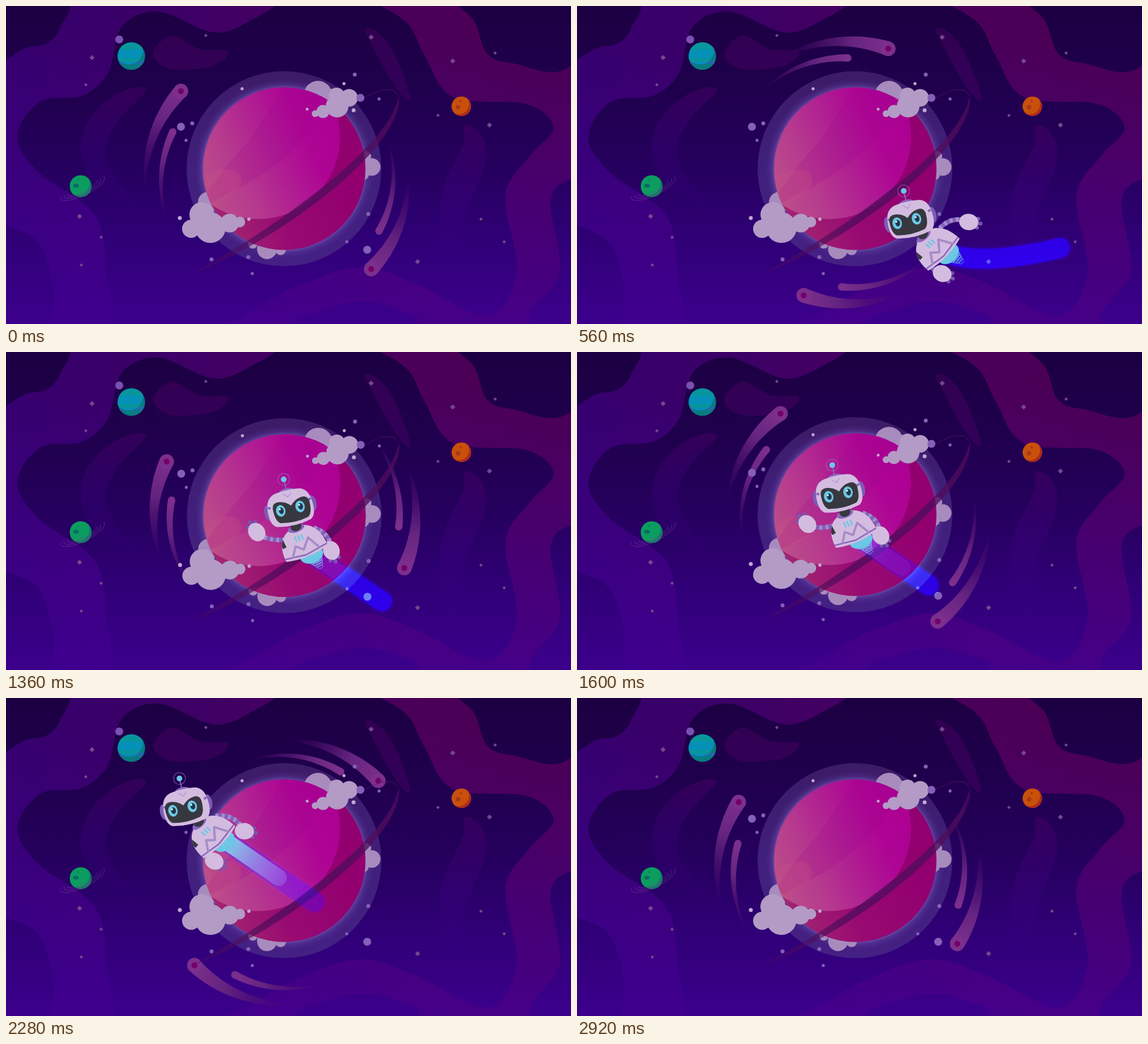
An HTML page with a canvas for the animation above (2960 ms loop, 998 px wide and 561 px high).

```html
<!DOCTYPE html>
<html lang="en">
<head>
<meta charset="utf-8">
<title>Robot in space</title>
<style>
html, body { margin: 0; width: 100%; height: 100%; overflow: hidden; background: #22004f; }
canvas { display: block; width: 998px; height: 561px; }
</style>
</head>
<body>
<canvas id="stage" width="998" height="561"></canvas>
<script>
const W = 998, H = 561, LOOP = 2960, STEP = 40, RAD = Math.PI / 180;
const ENTER = 560, LEAVE = 2280;
const SHELL = '#d3bce0', TRIM = '#8a66bd', CYAN = '#6cc8e4', INK = '#37383f';
const stage = document.getElementById('stage');
let c;

const clamp = u => Math.min(1, Math.max(0, u));
const mix = (a, b, u) => a + (b - a) * u;
function turn(x, y, deg) {
  const s = Math.sin(deg * RAD), k = Math.cos(deg * RAD);
  return [x * k - y * s, x * s + y * k];
}

// ---- drawing helpers ----
function disc(x, y, r, fill) {
  c.beginPath();
  c.arc(x, y, r, 0, 7);
  c.fillStyle = fill;
  c.fill();
}
function oval(x, y, rx, ry, fill) {
  c.beginPath();
  c.ellipse(x, y, rx, ry, 0, 0, 7);
  c.fillStyle = fill;
  c.fill();
}
function ring(x, y, rx, ry, color, width, rot = 0, from = 0, to = 360) {
  c.beginPath();
  c.ellipse(x, y, rx, ry, rot * RAD, from * RAD, to * RAD);
  c.strokeStyle = color;
  c.lineWidth = width;
  c.stroke();
}
function line(pts, color, width) {
  c.beginPath();
  for (let i = 0; i < pts.length; i += 2) c.lineTo(pts[i], pts[i + 1]);
  c.strokeStyle = color;
  c.lineWidth = width;
  c.stroke();
}
function shape(d, fill) {
  c.fillStyle = fill;
  c.fill(new Path2D(d));
}
function fade(x0, y0, x1, y1, ...cols) {
  const g = c.createLinearGradient(x0, y0, x1, y1);
  cols.forEach((col, i) => g.addColorStop(i / (cols.length - 1), col));
  return g;
}
function clipDisc(x, y, r, draw) {
  c.save();
  c.beginPath();
  c.arc(x, y, r, 0, 7);
  c.clip();
  draw();
  c.restore();
}
function place(x, y, deg, draw) {
  c.save();
  c.translate(x, y);
  c.rotate(deg * RAD);
  draw();
  c.restore();
}
// Closed smooth curve through x, y pairs
function blob(p, fill) {
  const n = p.length / 2, at = i => [p[(i + n) % n * 2], p[(i + n) % n * 2 + 1]];
  c.beginPath();
  c.moveTo(p[0], p[1]);
  for (let i = 0; i < n; i++) {
    const [a, b, d, e] = [at(i - 1), at(i), at(i + 1), at(i + 2)];
    c.bezierCurveTo(b[0] + (d[0] - a[0]) / 6, b[1] + (d[1] - a[1]) / 6,
      d[0] - (e[0] - b[0]) / 6, d[1] - (e[1] - b[1]) / 6, d[0], d[1]);
  }
  c.fillStyle = fill;
  c.fill();
}
// Band along at(u) with half-width wide(u)
function ribbon(at, wide, fill) {
  const N = 40, left = [], right = [];
  for (let i = 0; i <= N; i++) {
    const u = i / N, [x, y] = at(u), [ax, ay] = at(u - .01), [bx, by] = at(u + .01);
    const w = wide(u) / Math.hypot(bx - ax, by - ay);
    left.push([x - (by - ay) * w, y + (bx - ax) * w]);
    right.unshift([x + (by - ay) * w, y - (bx - ax) * w]);
  }
  c.beginPath();
  for (const p of left.concat(right)) c.lineTo(...p);
  c.fillStyle = fill;
  c.fill();
}
const bezier = (...p) => u => [0, 1].map(k => {
  const v = 1 - u;
  return v * v * v * p[k] + 3 * v * v * u * p[k + 2] + 3 * v * u * u * p[k + 4] + u * u * u * p[k + 6];
});
const rounded = w => u => w * Math.sqrt(Math.sin(Math.PI * u));

// ---- scenery ----
function backdrop() {
  c.fillStyle = fade(0, 0, W, 0, '#36006e', '#3a0067', '#450060', '#4b0058', '#4b0052');
  c.fillRect(0, 0, W, H);
  c.fillStyle = fade(0, 60, 0, H, 'rgba(60,0,160,0)', 'rgba(64,0,160,.32)', 'rgba(66,0,160,.68)');
  c.fillRect(0, 0, W, H);

  const dark = fade(0, 0, 0, H, '#1c0042', '#1f004c', '#25005d', '#300078', '#3c008c');
  blob([-60, -60, 103, -20, 95, 40, 70, 67, 35, 74, 0, 95, -60, 130], dark);
  blob([790, -40, 828, 28, 850, 84, 895, 101, 998, 105, 1080, -60], dark);
  blob([1080, 290, 998, 305, 962, 345, 978, 470, 928, 561, 1080, 640], dark);
  blob([510, 566, 575, 532, 635, 521, 690, 535, 727, 561, 620, 640], dark);
  blob([-60, 370, 0, 387, 65, 430, 75, 561, -60, 640], dark);
  // Inner space
  blob([20, 230, 60, 169, 135, 158, 180, 118, 205, 36, 270, 10, 370, 47, 448, 17, 520, -25, 600, -20, 665, 2,
    712, 34, 740, 88, 790, 161, 920, 173, 967, 215, 925, 265, 882, 335, 902, 470, 850, 546, 722, 489, 625, 461,
    510, 497, 385, 561, 220, 600, 182, 500, 160, 373, 58, 294], dark);

  const haze = 'rgba(105,0,120,.27)';
  blob([260, 84, 292, 52, 342, 76, 392, 80, 365, 106, 290, 111], haze);
  ribbon(bezier(634, 40, 665, 60, 680, 110, 713, 168), rounded(14), haze);
  ribbon(bezier(248, 146, 160, 180, 98, 279, 233, 352), rounded(23), fade(0, 145, 0, 350, haze, 'rgba(75,0,150,.2)', 'rgba(70,0,160,.05)'));
  ribbon(bezier(810, 210, 870, 280, 745, 310, 800, 480), rounded(27), fade(0, 210, 0, 470, haze, 'rgba(75,0,140,.2)', 'rgba(70,0,150,0)'));

  const star = r => ([x, y]) => shape(`M${x - r},${y}l${r},${-r} ${r},${r} ${-r},${r}z`, '#75488c');
  [[152, 91], [645, 55], [789, 97], [854, 210], [727, 451], [130, 371]].forEach(star(4.5));
  [[141, 139], [353, 52], [864, 83], [763, 193], [839, 376], [880, 416], [168, 408], [133, 457]].forEach(star(3.1));

  smallPlanets();
}

function smallPlanets() {
  disc(200, 59, 7, '#7a50b0');
  clipDisc(221.5, 88.5, 24.3, () => {
    disc(221, 88, 25, '#087c80');
    c.fillStyle = '#1a6fa0';
    c.fillRect(190, 96, 60, 7);
    clipDisc(217, 78, 25, () => {
      disc(217, 78, 26, '#0590b8');
      c.fillStyle = '#08969c';
      c.fillRect(190, 62, 60, 15);
      c.fillRect(190, 92, 60, 6);
    });
  });
  disc(132, 318, 19.3, '#0c8062');
  clipDisc(132, 318, 19.3, () => {
    disc(127, 313, 20.5, '#0c9c60');
    oval(123.5, 317, 5, 3.6, '#0a6c66');
    disc(127, 307, 1.7, '#0a7c62');
  });
  for (let i = 0; i < 3; i++) ring(135, 321, 43 - 7 * i, 13 - 3 * i, 'rgba(125,70,155,.6)', 1, -26, -10, 197);
  disc(804.5, 177, 17.3, '#ab2b1e');
  clipDisc(804.5, 177, 17.3, () => {
    disc(800, 173, 18, '#c8500a');
    disc(798.5, 178.5, 4, '#a53a18');
    disc(803, 168, 2, '#a53a18');
  });
}

function puffs(fill, ...list) {
  for (const p of list) disc(...p, fill);
}

function planet() {
  disc(491, 287, 172, fade(0, 115, 0, 459, '#3c1b67', '#40207c', '#442084'));
  const glow = c.createRadialGradient(491.5, 287, 142, 491.5, 287, 158);
  glow.addColorStop(0, 'rgba(125,120,215,.6)');
  glow.addColorStop(.35, 'rgba(105,75,170,.35)');
  glow.addColorStop(1, 'rgba(90,50,150,0)');
  disc(491.5, 287, 158, glow);
  line([694, 158, 684, 148, 662, 148, 630, 163], 'rgba(85,20,105,.4)', 2);

  puffs('#a88bbd', [551, 157, 25], [574, 160, 14], [357, 346, 18], [646, 284, 15.5], [636, 265, 9],
    [631, 297, 10], [461, 429, 17.5], [485, 430, 9.5], [436, 420, 8]);

  clipDisc(491.5, 287, 143.5, () => {
    c.fillStyle = fade(365, 400, 590, 300, '#a32a70', '#980a72', '#92006f');
    c.fillRect(340, 140, 310, 300);
    clipDisc(445, 231, 145, () => {
      c.fillStyle = fade(345, 310, 590, 200, '#ba4e8a', '#b63a8e', '#b01f92', '#ae0594', '#ac0092');
      c.fillRect(300, 80, 300, 300);
      blob([575, 120, 540, 218, 470, 285, 395, 330, 345, 350, 388, 285, 438, 225, 510, 120], 'rgba(150,0,140,.18)');
      blob([345, 310, 398, 288, 415, 315, 380, 345, 350, 375], 'rgba(200,80,130,.3)');
    });
  });
  ribbon(bezier(694, 158, 690, 255, 457, 415, 330, 471), u => 7.2 * Math.sin(Math.PI * u) ** .7,
    fade(330, 472, 694, 158, 'rgba(80,12,92,.3)', 'rgba(80,12,92,.78)', 'rgba(80,12,92,.8)', 'rgba(80,12,92,.75)'));

  puffs('#b39bc6', [584, 158, 14], [606, 162, 15.5], [585, 176.5, 20], [560, 186, 11.5], [546, 190, 6],
    [346, 368, 22], [361, 391, 27], [327, 393, 16], [395, 383, 16.5], [413, 381, 9.5]);
  puffs('#8460b8', [309, 213, 7], [638, 430, 7], [626, 162, 7], [329, 207, 3.5], [616, 121, 3.5], [640, 367, 3.5],
    [428, 443, 3.5], [363, 447, 3.5], [318, 237, 2.7], [659, 164, 2.7], [602, 416, 2.7], [435, 472, 2.7]);
  puffs('#bfa6d2', [417, 146, 2.7], [597, 137, 2.7], [614, 184, 3.5], [532, 182, 2.5], [307, 374, 3.5], [429, 376, 3]);
}

// ---- comets ----
function comet(angle, radius, sweep, drift, size, core) {
  const at = u => turn(radius + drift * u, 0, angle - sweep * u);
  const [x, y] = at(0);
  ribbon(at, u => size * (1 - u) ** .8, fade(x, y, ...at(1), '#7c2f8c', '#652480', 'rgba(85,20,115,.55)', 'rgba(75,10,110,0)'));
  disc(x, y, size, '#7c2f8c');
  if (core) disc(x, y, 5.2, '#750068');
}
function comets(t) {
  place(487, 298.5, .1172 * t + .9e-6 * t * t, () => {
    comet(219.8, 231.8, 46, 11, 13, true);
    comet(201.7, 207, 45, 12, 6.5);
    comet(46.3, 228.8, 46, -5, 13, true);
    comet(29.8, 198, 50, -1, 6.5);
  });
}

// ---- robot ----
// 0 while cruising, 1 when upright and waving
function wave(t) {
  return Math.sin(Math.PI * clamp((t - ENTER) / 1780)) ** 2;
}
// Steady glide, with a fast curved arrival and an accelerating exit
function position(t) {
  const g = t - ENTER, e = Math.max(0, -g), d = Math.max(0, t - LEAVE);
  return [
    639 - .1576 * g + 16 * wave(t) + .0024 * e ** 2 - .0017 * d ** 2,
    426 - .107 * g - 2.3e-6 * e ** 3 - .0014 * d ** 2
  ];
}
const lean = t => mix(-42, -18, wave(t));

function nozzle(t) {
  const [x, y] = position(t), [dx, dy] = turn(8, 22, lean(t));
  return [x + dx, y + dy];
}
// When the far end of the trail was laid down
function tailTime(t) {
  const hold = clamp((t - ENTER) / 1320) ** 3, leave = clamp((t - LEAVE) / 680) ** 2;
  return mix(Math.min(307, t * .55) + 1040 * hold, LOOP, leave);
}
function trail(t) {
  const far = tailTime(t);
  const run = from => {
    const pts = [];
    for (let i = 0; i <= 40; i++) pts.push(...nozzle(mix(from, t, i / 40)));
    return pts;
  };
  const long = run(far), core = run(mix(far, t, .42));
  c.save();
  c.lineCap = c.lineJoin = 'round';
  line(long, 'rgba(40,0,220,.22)', 36);
  c.globalCompositeOperation = 'color-dodge';
  line(long, 'rgb(0,22,18)', 44);
  line(long, 'rgb(0,30,32)', 36);
  // Stronger glow against open space
  c.save();
  c.beginPath();
  c.rect(0, 0, W, H);
  c.arc(491.5, 287, 143.5, 0, 7);
  c.clip('evenodd');
  line(long, 'rgb(0,26,24)', 41);
  line(long, 'rgb(0,44,42)', 34);
  c.restore();
  // Pale core over the planet
  c.globalCompositeOperation = 'source-over';
  clipDisc(491.5, 287, 143.5, () => {
    line(core, fade(395, 262, 545, 375, 'rgba(135,220,238,.85)', 'rgba(160,120,238,.6)', 'rgba(155,40,215,.25)'), 29);
  });
  c.restore();
}

function arm(sx, sy, hx, hy, cx, cy, rot) {
  const curve = new Path2D(`M${sx},${sy}Q${cx},${cy} ${hx},${hy}`);
  c.lineWidth = 8;
  c.strokeStyle = '#8062b8';
  c.stroke(curve);
  c.setLineDash([5, 6]);
  c.strokeStyle = '#a68bd0';
  c.stroke(curve);
  c.setLineDash([]);
  place(hx, hy, rot, () => {
    for (let i = -1; i < 2; i++) {
      const x = 21 - 5 * i * i, y = 8 * i;
      line([x - 8, y * .7, x, y], '#7557ad', 6);
      disc(x, y, 3.4, '#7557ad');
    }
    oval(0, 0, 17, 14.5, SHELL);
  });
}

function torso() {
  oval(5, 20, 21, 15, CYAN);
  for (let i = 0; i < 4; i++) ring(10 + i, 33 + i * 4, 11 - i * 2, 3, `rgba(110,190,230,${.8 - i * .13})`, 1.8, -9);
  const body = new Path2D('M-16,-34C12,-42 35,-26 38,13Q0,26 -41,18C-45,-8 -37,-28 -16,-34Z');
  c.fillStyle = SHELL;
  c.fill(body);
  c.save();
  c.clip(body);
  line([-43, 13, -4, 17, 38, 9], TRIM, 2.5);
  c.lineJoin = 'round';
  line([-28, 15, -17, -3, -5, 7, 9, -11, 23, 12], '#a68cc6', 4);
  line([-39, -26, -36, -6], INK, 7);
  c.restore();
  for (let i = 0; i < 3; i++) line([-13 + i * 6, -20, -12 + i * 6, -10], CYAN, 2.8);
  oval(-6, -33, 15, 7, TRIM);
  oval(-5, -36, 10, 8, INK);
}

function head(gaze) {
  line([0, -28, 0, -46], TRIM, 2);
  ring(0, -51, 10.5, 10.5, 'rgba(150,105,205,.8)', 1);
  disc(0, -51, 5, CYAN);
  oval(0, -29, 13, 6, TRIM);
  for (const side of [-1, 1]) oval(side * 40, 1, 7, 14, '#7c5bb5');
  shape('M-18,-30Q0,-33 20,-30Q37,-28 40,-6Q43,22 31,28Q0,36 -31,28Q-43,22 -40,-6Q-37,-28 -18,-30Z', SHELL);
  line([-7, -26, 0, -19, 7, -26], '#b093cc', 1.3);
  for (const side of [-1, 1]) line([side * 39, -8, side * 34, -6], TRIM, 4);
  place(gaze - 2, 4, 0, () => {
    shape('M-33,-9Q-31,-19 -21,-18Q-9,-17 0,-7Q9,-17 21,-18Q31,-19 33,-9Q34,14 25,19Q0,25 -25,19Q-34,14 -33,-9Z', INK);
    for (const x of [-20, 15]) {
      oval(x, -2, 8.3, 10.3, CYAN);
      oval(x + 1, -2, 4.2, 5.8, '#23354a');
      disc(x - 1, -5, 1.8, '#d8f3fa');
    }
  });
}

function robot(t) {
  const [x, y] = position(t), rot = lean(t), s = wave(t), lift = s ** 4, reach = s ** .6;
  const glide = clamp((t - ENTER) / (LEAVE - ENTER));
  const rx = 53 - 7 * s, ry = mix(-45, -7, glide) + 41 * lift;
  const lx = mix(6, -87, reach), ly = mix(46, -30, lift);
  const [sx, sy] = turn(24, -24, rot), [qx, qy] = turn(-30, -20, rot), [hx, hy] = turn(-4, -71, rot);
  place(x, y, 0, () => {
    arm(sx, sy, rx, ry, (sx + rx) / 2 + (ry - sy) * .35, (sy + ry) / 2 - (rx - sx) * .35, mix(8, 75, lift));
    arm(qx, qy, lx, ly, (qx + lx) / 2 - 8, (qy + ly) / 2 + 10, mix(25, 240, s));
    place(0, 0, rot, torso);
    place(hx, hy, -13, () => head(7 * lift - 2));
  });
}

// ---- playback ----
const still = document.createElement('canvas');
still.width = W;
still.height = H;
c = still.getContext('2d');
backdrop();
c = stage.getContext('2d');

function frame(now) {
  const t = Math.floor(now % LOOP / STEP) * STEP;
  c.drawImage(still, 0, 0);
  comets(t);
  const k = t - 1360, bob = 1.7 * Math.exp(-((k / 500) ** 2)) * Math.cos(k * Math.PI / 480);
  place(bob * .3, bob, 0, planet);
  if (t > 0 && t < 2900) {
    trail(t);
    robot(t);
  }
}
const start = performance.now();
function tick() {
  frame(performance.now() - start);
  requestAnimationFrame(tick);
}
tick();
</script>
</body>
</html>
```
